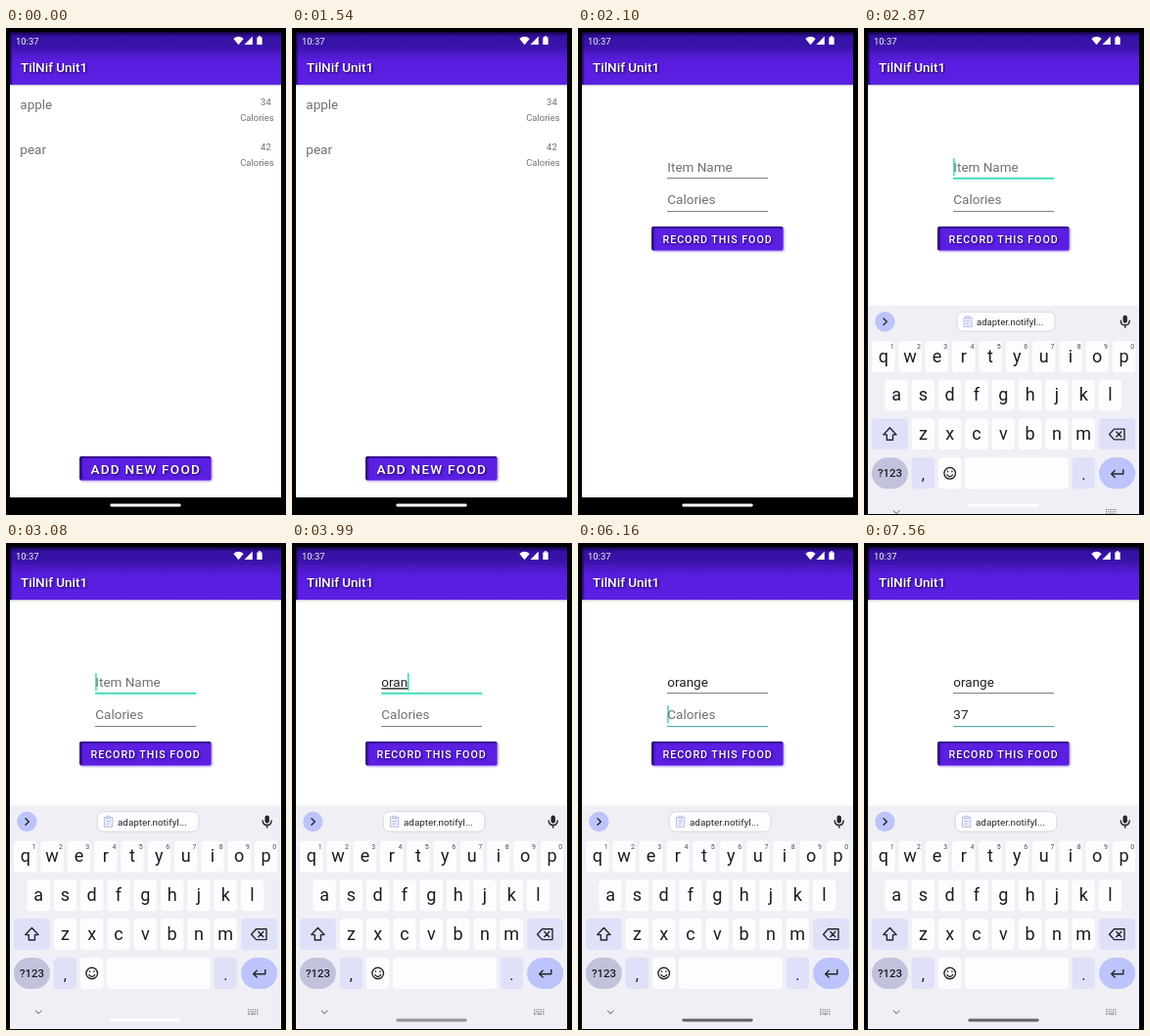
Write an HTML page that moves like this. It is 286x498 px and loops after 8000 ms.

```html
<!DOCTYPE html>
<html lang="en">
<head>
<meta charset="utf-8">
<title>Food log</title>
<style>
  html, body { margin: 0; width: 100%; height: 100%; overflow: hidden; background: #000; }
  svg { display: block; width: 100%; height: 100%; }
  text { font-family: Roboto, sans-serif; white-space: pre; }
  .item { font-size: 13.5px; fill: #707070; text-decoration-thickness: .8px; }
  .small { font-size: 9.45px; fill: #707070; }
  .title { font-size: 13.5px; font-weight: 500; fill: #fff; filter: drop-shadow(1.2px 1.2px .8px #120040); }
  .label { font-weight: 500; fill: #fff; letter-spacing: .0893em; filter: drop-shadow(1.2px 1.2px .8px #1a0058); }
  .key { font-size: 18px; fill: #1c1c20; text-anchor: middle; }
  .digit { font-size: 7px; fill: #484850; text-anchor: middle; }
  .icon { fill: none; stroke: #25262c; stroke-width: 1.4; stroke-linecap: round; stroke-linejoin: round; }
  .lift { filter: drop-shadow(1px 1px 1px rgba(92, 32, 228, .5)); }
  .system { fill: #fff; filter: drop-shadow(.8px .8px .6px #14004c); }
  .halo { filter: drop-shadow(1.3px 1.3px .9px rgba(70, 240, 210, .55)); }
</style>
</head>
<body>
<svg id="stage" viewBox="0 0 286 498" preserveAspectRatio="none" xmlns="http://www.w3.org/2000/svg">
  <defs>
    <linearGradient id="status" x2="0" y2="1">
      <stop offset="0" stop-color="#10043c"/><stop offset=".25" stop-color="#3411a2"/><stop offset="1" stop-color="#3d14b0"/>
    </linearGradient>
    <linearGradient id="bar" x2="0" y2="1">
      <stop offset="0" stop-color="#4517b8"/><stop offset=".3" stop-color="#581ddd"/><stop offset="1" stop-color="#5c20e4"/>
    </linearGradient>
    <linearGradient id="edge">
      <stop offset="0" stop-color="#12003c" stop-opacity=".8"/><stop offset="1" stop-color="#12003c" stop-opacity="0"/>
    </linearGradient>
    <linearGradient id="brow" x2="0" y2="1">
      <stop offset="0" stop-color="#12003c" stop-opacity=".7"/><stop offset="1" stop-color="#12003c" stop-opacity="0"/>
    </linearGradient>
    <linearGradient id="under" x2="0" y2="1">
      <stop offset="0" stop-opacity=".22"/><stop offset="1" stop-opacity="0"/>
    </linearGradient>
    <clipPath id="screen"><rect x="4" y="4" width="277" height="476"/></clipPath>
    <clipPath id="panel"><rect x="4" y="58" width="277" height="439"/></clipPath>
  </defs>
</svg>
<script>
const LOOP = 8000, STEP = 70;
const stage = document.getElementById('stage');

function add(parent, tag, attrs, content) {
  const node = document.createElementNS('http://www.w3.org/2000/svg', tag);
  set(node, attrs);
  if (content !== undefined) node.textContent = content;
  parent.appendChild(node);
  return node;
}
function set(node, attrs) {
  for (const name in attrs) node.setAttribute(name, attrs[name]);
}
const group = (parent, attrs = {}) => add(parent, 'g', attrs);
const rect = (parent, x, y, width, height, fill, rx = 0) =>
  add(parent, 'rect', { x, y, width, height, fill, rx });
const text = (parent, x, y, cls, content, attrs = {}) =>
  add(parent, 'text', { x, y, class: cls, ...attrs }, content);
const path = (parent, d, attrs = { class: 'icon' }) => add(parent, 'path', { d, ...attrs });
const show = (node, on) => node.setAttribute('visibility', on ? 'visible' : 'hidden');

// Phone screen
rect(stage, 0, 0, 286, 498, '#000');
const screen = group(stage, { 'clip-path': 'url(#screen)' });
rect(screen, 4, 58, 277, 422, '#fff');
rect(screen, 4, 58, 277, 2.5, 'url(#under)');
rect(screen, 4, 4, 277, 18.5, 'url(#status)');
rect(screen, 4, 22, 277, 36, 'url(#bar)');
rect(screen, 4, 4, 3, 54, 'url(#edge)');

const system = group(screen, { class: 'system' });
text(system, 10, 16.5, '', '10:37', { 'font-size': 9.45 });
path(system, 'M232.3 11 Q237.5 6.6 242.7 11 L237.5 17.2Z', {});
path(system, 'M251.8 8.6 V17 H243.4Z', {});
path(system, 'M256.3 9.5 H257.7 V8.3 H260.3 V9.5 H261.7 V17 H256.3Z', {});

function button(parent, y, size, baseline, label) {
  const g = group(parent);
  const box = fill => rect(g, 75.2, y, 134.4, 24.6, fill, 2.6);
  box('#5b1fe2').setAttribute('class', 'lift');
  rect(g, 75.2, y, 4, 24.6, 'url(#edge)', 2);
  rect(g, 75.2, y, 134.4, 3, 'url(#brow)', 2);
  const glow = box('#fff');
  glow.setAttribute('opacity', 0);
  text(g, 86.5, baseline, 'label', label, { 'font-size': size });
  return glow;
}

// Food list
const list = group(screen);
text(list, 15, 45, 'title', 'TilNif Unit1');
[['apple', 34], ['pear', 42]].forEach(([name, amount], i) => {
  const y = i * 46.4;
  text(list, 14.3, 82.5 + y, 'item', name);
  text(list, 265.4, 78.6 + y, 'small', amount, { 'text-anchor': 'middle' });
  text(list, 239.2, 94.8 + y, 'small', 'Calories');
});
const glow = button(list, 438, 13.6, 455.6, 'ADD NEW FOOD');

// Entry form
const form = group(screen);
text(form, 15, 45, 'title', 'TilNif Unit1');
button(form, 203, 10.7, 219.7, 'RECORD THIS FOOD');

function field(y, hint) {
  const caret = rect(form, 91.3, y - 14.2, 1.2, 18, '#2fc9b4');
  caret.setAttribute('class', 'halo');
  return {
    hint, caret,
    text: text(form, 91.3, y, 'item', hint),
    line: rect(form, 91, Math.round(y + 6.2), 103, 1, '#808080')
  };
}
const nameField = field(147.2, 'Item Name');
const calField = field(180.4, 'Calories');

function setField(f, value, caret, color, weight, composing) {
  f.text.textContent = value || f.hint;
  f.text.style.fill = value ? '#202020' : '#707070';
  f.text.style.textDecorationLine = composing && value ? 'underline' : 'none';
  set(f.line, { fill: color, height: weight, class: composing ? 'halo' : '' });
  show(f.caret, caret);
  if (caret) f.caret.setAttribute('x', 91.3 + (value ? f.text.getComputedTextLength() : 0));
}

// Keyboard
const keyClip = group(stage, { 'clip-path': 'url(#panel)' });
const keyboard = group(keyClip);
rect(keyboard, 4, 268.5, 277, 240, '#f0eff5');

const PITCH = 27.3, PALE = '#dfe1f8', BLUE = '#bcc4fb';
function cap(cx, cy, w = 23.4, fill = '#fdfdff', rx = 4) {
  rect(keyboard, cx - w / 2, cy - 16, w, 32, fill, rx);
}
function letters(row, x, cy) {
  [...row].forEach((ch, i) => {
    const cx = x + i * PITCH;
    cap(cx, cy);
    text(keyboard, cx, cy + 5.6, 'key', ch);
  });
}
letters('qwertyuiop', 19.8, 320.7);
for (let i = 0; i < 10; i++) text(keyboard, 28.6 + i * PITCH, 313, 'digit', (i + 1) % 10);
letters('asdfghjkl', 33.1, 360.3);
letters('zxcvbnm', 60.4, 400);

cap(26.4, 400, 37, PALE);
path(keyboard, 'M26.4 393.5 L33 400.6 H29.5 V406 H23.3 V400.6 H19.8Z');
cap(258.6, 400, 37, PALE);
path(keyboard, 'M255.5 394.8 H266 V405.6 H255.5 L250.6 400.2Z M257.8 397.6 L262.8 402.8 M262.8 397.6 L257.8 402.8');

cap(26.4, 440, 37, '#c1c3dc', 16);
text(keyboard, 26.4, 444.2, 'key', '?123', { style: 'font-size:11.4px;font-weight:500' });
cap(60.4, 440, 23.4, PALE);
text(keyboard, 60.4, 447, 'key', ',', { style: 'font-size:16px' });
cap(87.7, 440);
add(keyboard, 'circle', { cx: 87.7, cy: 440, r: 5.8, class: 'icon' });
path(keyboard, 'M85.5 438 V438.4 M89.9 438 V438.4 M84.8 441.6 Q87.7 445.3 90.6 441.6');
cap(156, 440, 106);
cap(224.3, 440, 23.4, PALE);
text(keyboard, 224.3, 447, 'key', '.', { style: 'font-size:16px' });
cap(258.6, 440, 37, BLUE, 16);
path(keyboard, 'M264.8 436.5 V440.7 H253 M256.2 437.3 L252.7 440.7 L256.2 444.1');

add(keyboard, 'circle', { cx: 21.4, cy: 285, r: 10.2, fill: BLUE });
path(keyboard, 'M20 281.8 L23.3 285 L20 288.2');
rect(keyboard, 264.5, 278.4, 4.4, 8, '#25262c', 2.2);
path(keyboard, 'M262.2 283.9 Q262.4 288.5 266.7 288.5 Q271 288.5 271.2 283.9 M266.7 288.5 V291');
path(keyboard, 'M30.2 478.4 L33.2 481.2 L36.2 478.4', { class: 'icon', style: 'stroke:#55565e;stroke-width:1' });
for (let row = 0; row < 3; row++)
  path(keyboard, `M247 ${477.2 + row * 2.3} H257.5`,
    { stroke: '#66676f', 'stroke-width': 1.1, 'stroke-dasharray': row < 2 ? '1.2 1.1' : '2 1 5 1' });

const chip = group(keyboard);
set(rect(chip, 93.2, 274.7, 103.6, 20.4, '#fdfdff', 6), { stroke: '#cfcfd9', 'stroke-width': .8 });
const blueLine = { fill: '#eceefd', stroke: '#aab1dc', 'stroke-width': .8 };
path(chip, 'M100.4 280.5 H108.8 V290.3 H100.4Z', blueLine);
path(chip, 'M102.8 279.3 H106.4 V281.6 H102.8Z M102.4 284.5 H106.8 M102.4 287.2 H105.8', blueLine);
text(chip, 114, 288.5, '', 'adapter.notifyI...', { 'font-size': 9.85, fill: '#24252b' });

const handle = rect(stage, 106.3, 486.5, 72.4, 2.9, '#fff', 1.45);

// Timeline
const NAME_KEYS = [3220, 3500, 3780, 3990, 4130, 4340];
const CAL_KEYS = [6580, 7000];
const typed = (word, keys, t) => word.slice(0, keys.filter(k => t >= k).length);
const clamp = v => Math.max(0, Math.min(1, v));
const stepsSince = (t, start) => Math.floor((t - start) / STEP);

function draw(t) {
  // Press, then the list slips left while the form slides in
  const enter = stepsSince(t, 1890) + 1;
  const formAlpha = clamp(enter * .5);
  set(list, {
    transform: `translate(${-2.5 * clamp((t - 1610) / 140)} 0)`,
    opacity: 1 - formAlpha
  });
  set(form, {
    transform: `translate(${enter > 3 ? 0 : 12 * .42 ** Math.max(0, enter - 1)} 0)`,
    opacity: formAlpha
  });
  glow.setAttribute('opacity', .12 * clamp((t - 1540) / 140));

  const onName = t >= 2590 && t < 5040;
  const onCal = t >= 5040;
  setField(nameField, typed('orange', NAME_KEYS, t), onName,
    onName ? '#25d3ae' : '#808080', onName ? 1.4 : 1, onName);
  const blink = t < 5670 || (t >= 6160 && t < 7560);
  setField(calField, typed('37', CAL_KEYS, t), onCal && blink,
    onCal ? '#5aaea6' : '#808080', onCal ? 1.2 : 1, false);

  // Keyboard rises and settles
  const rise = stepsSince(t, 2800);
  const lift = rise >= 4 ? 0 : 85 * .18 ** Math.max(0, rise);
  const scale = 1 - .035 * clamp(lift / 15);
  show(keyboard, t >= 2800);
  keyboard.setAttribute('transform', `translate(0 ${lift})`);
  chip.setAttribute('transform', `translate(145 285) scale(${scale}) translate(-145 -285)`);

  const shade = Math.round(255 - 157 * (1 - (1 - clamp((t - 3150) / 1540)) ** 1.5));
  handle.setAttribute('fill', `rgb(${shade},${shade},${shade})`);
}

const start = performance.now();
function tick() {
  draw((performance.now() - start) % LOOP);
  requestAnimationFrame(tick);
}
tick();
</script>
</body>
</html>
```
